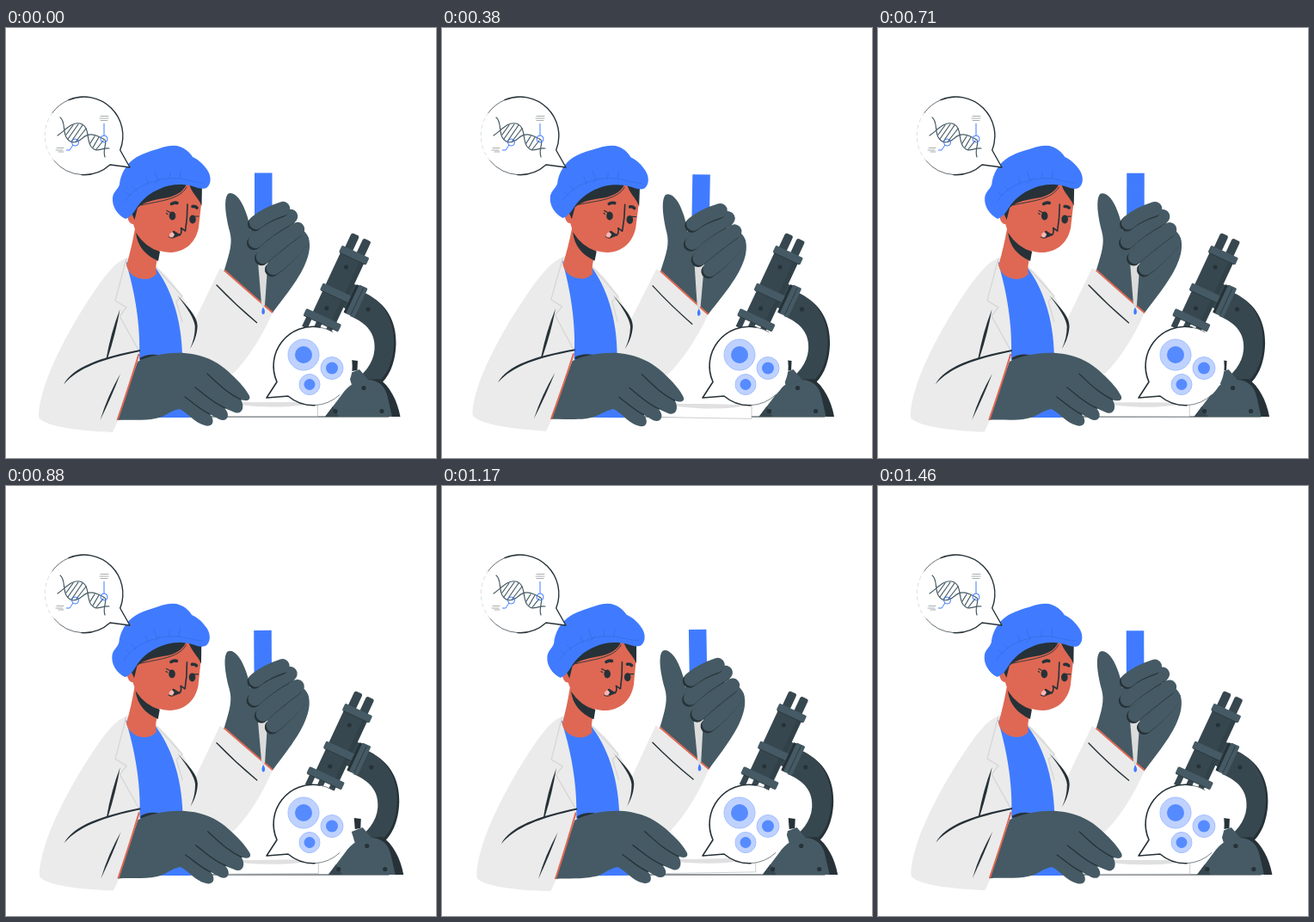
Animation, 500 px wide and 500 px high, one loop 1500 ms. Source, as an HTML page:

```html
<!DOCTYPE html>
<html lang="en">
<head>
<meta charset="utf-8">
<title>Laboratory</title>
<style>
html, body { margin: 0; width: 100%; height: 100%; overflow: hidden; background: #fff; }
svg { display: block; width: 100vw; height: 100vh; }
.ink { fill: #263238; }
.slate { fill: #37474f; }
.steel { fill: #455a64; }
.blue { fill: #407bff; }
.coat { fill: #ebebeb; }
.skin { fill: #de6854; }
.line { fill: none; stroke: #263238; stroke-linecap: round; stroke-linejoin: round; }
.seam { fill: none; stroke: #d6d6d6; stroke-width: 1.3; }
.cuff { fill: none; stroke: #de6854; stroke-width: 2; }
.fold { fill: none; stroke: #386fe6; stroke-width: .9; stroke-linecap: round; }
.helix { fill: none; stroke: #455a64; stroke-width: 1.2; stroke-linecap: round; }
.thin { fill: none; stroke: #407bff; stroke-width: 1; }
.halo { fill: #bfd2ff; stroke: #a3bfff; stroke-width: 1; }
.core { fill: #568bff; }
</style>
</head>
<body>
<svg viewBox="0 0 500 500">
  <path class="line" stroke-width="1" d="M178 452H445"/>

  <g id="scope">
    <path class="ink" d="M418 309C443 320 454 342 453.500 367C453 391 444 408 434 415L426 411L445 360Z"/>
    <path class="slate" d="M415 307C439 317 451 340 451 364C451 390 441 407 430 413L402 412C416 403 427 391 428.500 374C430 356 420 343 400 335Z"/>
    <path class="ink" d="M401 386L409 387L408.500 398L402 399Z"/>
    <path class="ink" d="M415 409L434 408C446 416 455 433 458.500 452H440Z"/>
    <path class="steel" d="M371 452L390 427Q402 409 421 409Q440 410 444 430L449 452Z"/>
    <path class="slate" d="M371 452L380 440L387 452Z"/>
    <path class="steel" d="M398 402L411 397L422 410L402 415Z"/>
    <g transform="translate(404.500 264.500) rotate(25)">
      <rect class="slate" x="-13.500" y="-23" width="10" height="24" rx="2.500"/>
      <rect class="slate" x="1.500" y="-23" width="10" height="24" rx="2.500"/>
      <rect class="slate" x="-15.500" y="0" width="30" height="82"/>
      <rect class="slate" x="12" y="30" width="10" height="30"/>
      <rect class="ink" x="9" y="4" width="5.500" height="76" opacity=".3"/>
      <path class="slate" d="M-20 87h7v13h-7zM-7 87h7v13h-7zM7 87h7v13h-7z"/>
      <rect class="steel" x="-17.500" y="-5" width="35" height="9" rx="1.500"/>
      <rect class="steel" x="-19" y="44" width="37" height="9" rx="1.500"/>
      <rect class="steel" x="-24" y="79" width="45" height="9" rx="1.500"/>
      <rect class="ink" x="17" y="29" width="5" height="36" rx="1"/>
      <rect class="steel" x="20" y="28" width="11" height="37" rx="1.500"/>
      <path class="line" stroke-width=".7" d="M-16 4H16M-17 53H16M-23 88H20M26 30V63"/>
    </g>
    <g class="ink">
      <circle cx="395.500" cy="278" r="2.500"/><circle cx="373" cy="326" r="2.500"/>
      <circle cx="421" cy="327" r="2.600"/><circle cx="416" cy="418.500" r="2.600"/>
      <circle cx="383" cy="445.500" r="2.600"/><circle cx="437" cy="445.500" r="2.600"/>
    </g>
  </g>

  <g id="woman">
    <path fill="#fff" stroke="#a9aeb0" stroke-width=".6" d="M245 436H362.500V451.500H245Z"/>
    <path fill="#e0e0e0" d="M258 435.500H357Q340 441 306 440.500Q276 440 258 435.500Z"/>

    <!-- coat and shirt -->
    <path class="coat" d="M249 279L310 331C298 358 282 384 264 402L200 396L205 350L219 341Z"/>
    <path class="coat" d="M141 267C128 272 119 283 104 304C82 336 57 380 45 416C40 432 37 446 38.500 454C50 464 82 468 124 470L130 457L165 430L211 400C225 372 226 352 217 334C207 312 192 291 174 277Z"/>
    <path class="blue" d="M139 271C149 284 163 285 174 279C191 302 204 336 205 380L214 453H176L155 385C157 345 149 303 139 271Z"/>
    <path class="seam" d="M140 268L127 317L140 325L132 335L155 376M175 279L205 312L198 318L205 342"/>
    <path class="ink" d="M156 383.500Q164 378.500 176 380V383L156 386Z"/>
    <path class="ink" d="M199 310.500C212 325 223 336 222.600 347C222 357 219 365 214 373C218 364 219.800 356 219.800 347C219 338 211 326 199 310.500Z"/>
    <path class="ink" d="M132.500 327Q128 354 118 384.500L116.500 384.500Q122 354 132.500 327Z"/>
    <path class="ink" d="M67 414.500C78 394 110 383 156 374L156 376C112 385 84 395 67 414.500Z"/>
    <path class="ink" d="M133 402Q124 426 109.500 456Q118 428 133 402Z"/>
    <path class="line" stroke-width="1.400" d="M245 299Q267 322 291.500 342.500"/>

    <!-- head -->
    <path class="skin" d="M150 233Q146 256 140 276C143 287 152 292 162 292Q169 292 175 286C173 277 176 268 179 258Z"/>
    <path class="ink" d="M151 238Q162 255 179 260L177 271C162 264 153 254 151 238Z"/>
    <path class="skin" d="M153 207C145 207 140 213 141.500 221C143 227 146 228 148 228C153 247 171 261 192 261C210 260 221 248 224 232L227 205L226 184L190 178Z"/>
    <path class="ink" d="M143 210C150 188 179 176 211 179C208 189 200 194 189 197C173 200 162 201 153 209L149.500 223Q147 217 143 210Z"/>
    <path class="ink" d="M212 179L228 182L227.500 207C224 197 216 193 212 179Z"/>
    <path class="line" stroke-width=".9" d="M157 206C178 201 202 200 210 185"/>
    <path class="blue" d="M139 222C129 217 123 207 124 197C125 190 130 188 132 182C133 170 140 157 152 150C163 144 173 142 183 138.500Q191 136 199 137C208 139 214 145 217 150C224 153 230 159 234 165C239 172 239 182 233 186C228 188 223 186 217 184C203 180.500 190 182 180 186.500C166 192 158 200 152 209C148 215 146 219 139 222Z"/>
    <path class="fold" d="M138 202C148 186 167 177 188 175C206 173 216 180 230 180M152 190L147 184M166 182L163 174M177 178L173 167M190 175L191 168M202 175L203 166M145 195L140 191M173 181L180 174"/>
    <path class="line" stroke-width="3.600" d="M192.500 204.500Q196 202.500 199 203.500M217 207.500Q220 207 222 209"/>
    <ellipse class="ink" cx="193.500" cy="218.500" rx="3.800" ry="5"/>
    <ellipse class="ink" cx="217" cy="222.500" rx="3.800" ry="5"/>
    <path class="line" stroke-width="1.200" d="M192 215L187 212.500M188 216.500L186.500 215.500M219 219L224 219"/>
    <path class="line" stroke-width="1.600" d="M211 205Q211 221 208.500 236L203.500 232.500Q205 238 202 241L195 236.500"/>
    <path class="ink" d="M194 236Q198 240 203 239.500Q200 244 194 243Z"/>
    <path fill="#f6b9b6" d="M190 240Q193 235 196 240Q195 244 190 244Z"/>
    <path class="line" stroke-width="1" d="M189.500 243Q194 246 198 242"/>

    <!-- raised hand -->
    <path class="blue" d="M289 168.500H309.500V235H289Z"/>
    <path class="steel" d="M254 281C260 261 264 250 260 236C255 217 253 199 258 193C264 189 273 198 278 212C282 222 283 228 284 235L318 226L345 235C354 241 354 253 352 262C347 283 333 301 310 331Z"/>
    <path class="cuff" d="M253.500 281.500L310 331"/>
    <path fill="#dcdcdc" d="M293 272H304.500L301 322L298.500 325L297 321Z"/>
    <path class="blue" d="M299 324.500Q302 329 300.500 332Q299 334 297.700 332Q296.500 329 299 324.500Z"/>
    <g id="fingers" fill="none" stroke-linecap="round" stroke-width="16.500"></g>

    <!-- resting hand -->
    <path class="steel" d="M153 388C168 380 196 375 219 379.500C236 383 248 390 258 399C268 408 277 417 282 426C286 432 281 435 273 432C278 440 275 450 266 447L254 442C262 450 257 459 248 455L237 449C244 457 240 465 231 462C219 459 212 448 202 443C190 445 186 452 174 454C160 457 145 455 129 456Z"/>
    <path class="cuff" d="M154.500 379Q144 414 129.500 456"/>
    <path class="line" stroke-width="1.300" d="M234 402C245 412 256 424 273 432M220 418C231 426 239 435 255 442M208 429C218 436 226 444 237 449"/>
  </g>

  <!-- helix bubble -->
  <circle cx="90.600" cy="125.400" r="45.300" fill="#fff"/>
  <path fill="#fff" d="M133 142L144 162L121 159Z"/>
  <path class="line" stroke-width=".4" stroke-dasharray="4 4" opacity=".4" d="M54 98.500A45.300 45.300 0 0 0 56 154.500"/>
  <path class="line" stroke-width="1.400" d="M73 83.600A45.300 45.300 0 0 1 132.700 142L144 162L121 159A45.300 45.300 0 0 1 88 170.600"/>
  <path class="line" stroke-width=".7" d="M73 83.600A45.300 45.300 0 0 0 54 98.500M88 170.600A45.300 45.300 0 0 1 56 154.500"/>
  <path class="helix" d="M63 104C69 108 66 119 70 127C75 136 83 133 89 128C97 121 105 124 115 130C118 134 112 140 115 150M60 125C69 119 76 109 86 111C98 114 93 130 99 138C105 146 110 139 120 140"/>
  <path class="helix" d="M70 124L78 113M72 129L84 112M76 132L89 113M82 131L93 117M98 134L103 126M101 139L108 127M105 141L113 131"/>
  <path class="thin" d="M114 111V125M78 136L74 142H70"/>
  <circle class="thin" cx="80.500" cy="133" r="4"/><circle class="thin" cx="114" cy="129" r="4"/>
  <path class="line" stroke-width=".5" opacity=".8" d="M110 102.500H119M109 105H119M110 107.500H118M59 139.500H67M58 142H66M61 144H67"/>

  <!-- cell bubble -->
  <circle cx="357" cy="393" r="45.700" fill="#fff"/>
  <path fill="#fff" d="M315 412L303 430L328 428Z"/>
  <path class="line" stroke-width="1.600" d="M365 348A45.700 45.700 0 0 0 315 411.500L303 430L328 428A45.700 45.700 0 0 0 359 438.700"/>
  <path class="line" stroke-width=".6" d="M365 348A45.700 45.700 0 0 1 380 353.500M359 438.700A45.700 45.700 0 0 0 388 426.500"/>
  <circle class="halo" cx="346" cy="380" r="18"/><circle class="core" cx="346" cy="380" r="10"/>
  <circle class="halo" cx="379" cy="395.500" r="13"/><circle class="core" cx="379" cy="395.500" r="7"/>
  <circle class="halo" cx="353" cy="414.500" r="12"/><circle class="core" cx="353" cy="414.500" r="6.500"/>
</svg>
<script>
const LOOP = 1500, STEP = LOOP / 36;
const el = id => document.getElementById(id);

// Lower fingers first, each with a dark rim along its lower left side.
const fingers = ["M311 279Q326 269 344 247", "M299 266Q313 253 339 234",
                 "M290 248Q304 234 331 219", "M291 226Q303 216 322 210"];
el("fingers").innerHTML = fingers.map(d =>
  `<path d="${d}" stroke="#263238" transform="translate(-1.8 2)"/><path d="${d}" stroke="#455a64"/>`).join("");

// The standard "ease" curve, solved by bisection.
function ease(x) {
  const bez = (a, b, s) => 3 * a * s * (1 - s) ** 2 + 3 * b * s * s * (1 - s) + s ** 3;
  let lo = 0, hi = 1;
  for (let i = 0; i < 24; i++) {
    const mid = (lo + hi) / 2;
    if (bez(.25, .25, mid) < x) lo = mid; else hi = mid;
  }
  return bez(.1, 1, lo);
}

const shake = [0, -1, 2, -4, 4, -4, 4, -4, 2, -1, 0];
function shakeAt(p) {
  const i = Math.floor(p * 10);
  return shake[i] + (shake[i + 1] - shake[i]) * ease(p * 10 - i);
}

function swayAt(p) {
  if (p < .25) return p * 4;
  return p < .75 ? 2 - p * 4 : p * 4 - 4;
}

function draw(ms) {
  const t = Math.floor((ms + 5) / STEP) * STEP % LOOP;
  const late = (t - 8 + LOOP) % LOOP;
  el("woman").setAttribute("transform", `rotate(${swayAt(t / LOOP)} 196 303)`);
  el("scope").setAttribute("transform", `translate(${shakeAt(late / LOOP)} 0)`);
}

const start = performance.now();
function tick() {
  draw(performance.now() - start);
  requestAnimationFrame(tick);
}
tick();
</script>
</body>
</html>
```
